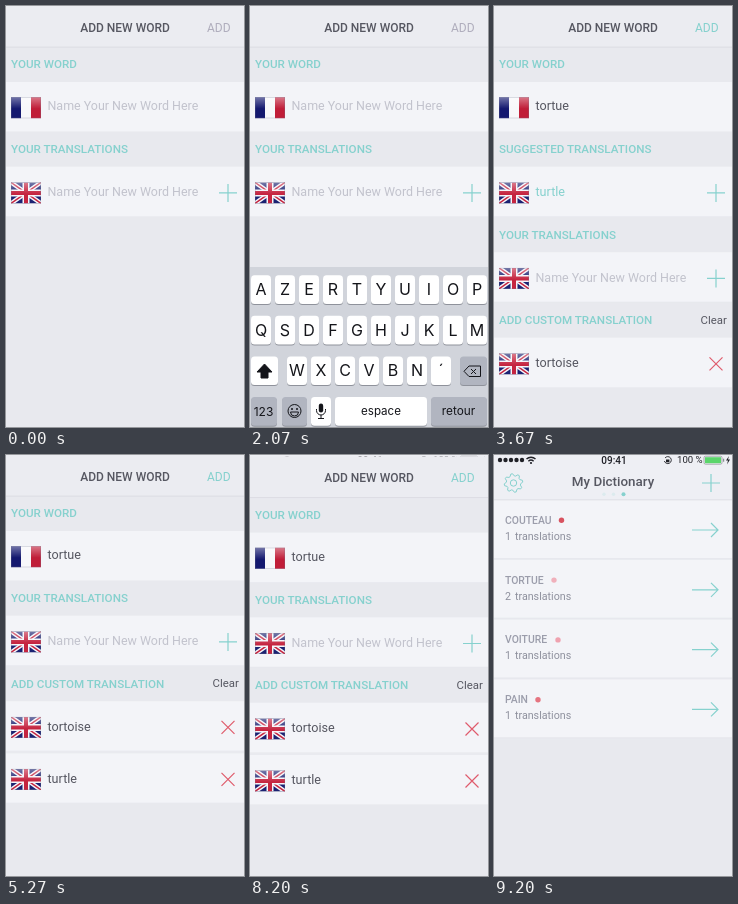
Write an HTML page that moves like this. It is 238 px wide and 421 px high and loops after 9.27 s.

```html
<!DOCTYPE html>
<html lang="en">
<head>
<meta charset="utf-8">
<title>Add new word</title>
<style>
  html, body { margin: 0; width: 100%; height: 100%; overflow: hidden; background: #e8e9ee; }
  svg { display: block; width: 100vw; height: 100vh; }
  text { font-family: Roboto, sans-serif; white-space: pre; }
  .keys text { font-family: Inter, sans-serif; text-anchor: middle; }
  #small text { font-weight: 300; }
</style>
</head>
<body>
<svg id="stage" viewBox="0 0 238 421"></svg>
<script>
const LOOP = 9270;
const TEAL = '#86d1ce', INK = '#565761', RED = '#df5b6c', BG = '#e8e9ee', ROW = '#f3f4f8';
const HINT = '#c2c3cd', PROMPT = 'Name Your New Word Here';

// Shape helpers; text is placed by the middle of its capitals
const text = (x, y, s, size, fill, more = '') =>
  `<text x="${x}" y="${y + size * .36}" font-size="${size}" fill="${fill}" ${more}>${s}</text>`;
const rect = (x, y, w, h, fill, more = '') =>
  `<rect x="${x}" y="${y}" width="${w}" height="${h}" fill="${fill}" ${more}/>`;
const line = (d, color, width = 1, more = '') =>
  `<path d="${d}" fill="none" stroke="${color}" stroke-width="${width}" ${more}/>`;
const dot = (x, y, r, fill) => `<circle cx="${x}" cy="${y}" r="${r}" fill="${fill}"/>`;
const group = (id, body, more = '') => `<g id="${id}" ${more}>${body}</g>`;
const MEDIUM = 'font-weight="500"', TITLE = MEDIUM + ' text-anchor="middle"';

const plus = (x, y) => line(`M${x - 9} ${y}h18M${x} ${y - 9}v18`, TEAL, 1.2);
const cross = (x, y) => line(`M${x - 6.5} ${y - 6.5}l13 13m0-13l-13 13`, RED, 1.2);

const french = y => rect(5, y, 30, 21, '#f7f7fa') + rect(5, y, 10, 21, '#14186f') +
  rect(25, y, 10, 21, '#c01d38') + gloss(y);
const british = y => `<svg x="5" y="${y}" width="30" height="21" viewBox="0 0 30 21">` +
  rect(0, 0, 30, 21, '#1b2272') +
  line('M0 0L30 21M30 0L0 21', '#f5f5f9', 4.4) + line('M0 0L30 21M30 0L0 21', '#c52540', 1.5) +
  line('M15 0V21M0 10.5H30', '#f5f5f9', 7) + line('M15 0V21M0 10.5H30', '#c52540', 4) +
  '</svg>' + gloss(y);
const gloss = y => rect(5, y, 30, 21, 'url(#shine)') +
  rect(5.2, y + .2, 29.6, 20.6, 'none', 'stroke="#777b91" stroke-width=".4" opacity=".6"');

const header = (s, y = 0) => rect(0, y, 238, 35.7, BG) + text(5, y + 17.7, s, 11.65, TEAL, MEDIUM);
const row = (y, label, fill, icon) => rect(0, y, 238, 49.5, ROW) + british(y + 15.7) +
  text(41.5, y + 24.9, label, label === PROMPT ? 12.45 : 12.6, fill) + icon(222, y + 26.2);

function form() {
  const entries = ['tire-bouchon', 'tigre', 'tortue'].map((word, i) => {
    const y = 143.5 + i * 33;
    return `<path d="M10 ${y - 5.5}l15 5.5l-15 5.5z" fill="#f4fbfb"/>` +
      text(31, y, 'You already entered:', 12.5, '#f4fbfb') +
      text(151, y, word, 12.5, '#fff', 'font-weight="700"');
  }).join('');
  return rect(0, 0, 238, 421, BG) +
    group('suggested', header('SUGGESTED TRANSLATIONS') + row(35.5, 'turtle', TEAL, plus)) +
    group('yours', header('YOUR TRANSLATIONS') + row(35.5, PROMPT, HINT, plus)) +
    group('custom', header('ADD CUSTOM TRANSLATION') + text(206.5, 17.7, 'Clear', 11.4, INK) +
      group('added', row(87.5, 'turtle', INK, cross) + rect(0, 85, 238, 2.5, '#e9eaef')) +
      row(35.5, 'tortoise', INK, cross)) +
    group('known', rect(0, 126, 238, 101, '#8ed4d1') + entries, 'clip-path="url(#reveal)"') +
    rect(0, 0, 238, 41, '#ebecf1') + text(119, 21.2, 'ADD NEW WORD', 12, INK, TITLE) +
    text(201, 21.2, 'ADD', 12, '#b0aebd', 'id="add"') +
    header('YOUR WORD', 40.5) + rect(0, 40.7, 238, .8, '#d9dae1') +
    rect(0, 76, 238, 49.5, ROW) + french(91.2) + text(41.5, 99.7, '', 12.6, INK, 'id="word"') +
    rect(42, 92.5, 1.2, 15.5, TEAL, 'id="caret"');
}

function keyboard() {
  const GREY = '#b1b5c0', DARK = '#14151a';
  const key = (x, y, w, fill, more = '') => rect(x, y + 1, w, 28.7, '#8f929b', 'rx="3.5"') +
    rect(x, y, w, 28.7, fill, `rx="3.5" ${more}`);
  const rows = ['azertyuiop', 'qsdfghjklm', 'wxcvbn’'];
  const top = j => 269.2 + 40.6 * j;
  const each = draw => rows.map((r, j) => [...r].map((c, i) =>
    draw(c, (j === 2 ? 47 : 11) + 24 * i, top(j))).join('')).join('');
  const caps = each((c, x, y) => text(x, y + 14.2, c === '’' ? '´' : c.toUpperCase(), 16, DARK));
  const small = each((c, x, y) => text(x, y + 13.7, c, 18, DARK));
  return rect(0, 261, 238, 160, '#d1d4db') +
    each((c, x, y) => key(x - 10, y, 20, '#fff')) +
    key(1, top(2), 27, GREY, 'id="shift"') + key(210, top(2), 27, GREY) +
    `<path id="arrow" d="M14.5 358l7.5 8h-4v6h-7v-6h-4z" stroke="${DARK}" stroke-linejoin="round"/>` +
    line('M219 360h11.5v10.5h-11.5l-5-5.2zM221 363l5 5m0-5l-5 5', DARK, 1, 'stroke-linejoin="round"') +
    group('caps', caps) + group('small', small) +
    key(1, top(3), 26, GREY) + key(32, top(3), 25, GREY) + key(61, top(3), 20, '#fff') +
    key(85, top(3), 92, '#fff') + key(181, top(3), 56, GREY) +
    text(13.5, 405.5, '123', 12, DARK) + text(131, 405, 'espace', 11.6, DARK) +
    text(208.5, 405, 'retour', 11.8, DARK) +
    `<circle cx="44.5" cy="405" r="6.5" fill="none" stroke="${DARK}"/>` +
    dot(42, 403, 1, DARK) + dot(47, 403, 1, DARK) +
    line('M40.5 406h8a4 4 0 0 1-8 0z', DARK) +
    rect(68.8, 397.5, 4.4, 9, DARK, 'rx="2.2"') +
    line('M66.5 403v1.5a4.5 4.5 0 0 0 9 0v-1.5M71 409v3.5M68 412.5h6', DARK);
}

function dictionary() {
  const words = [['COUTEAU', 1, 67.5, '#d8525f'], ['TORTUE', 2, 60, '#f0b0bb'],
    ['VOITURE', 1, 64, '#efa2af'], ['PAIN', 1, 44, '#e57480']];
  const rows = words.map(([word, count, x, color], i) => {
    const y = 45 + i * 59.8;
    return rect(0, y, 238, 58, ROW) + rect(0, y + 58, 238, 1.8, '#e7e8ee') +
      text(11, y + 20, word, 10.4, '#9b9dab', MEDIUM) + dot(x, y + 20.3, 2.7, color) +
      text(11, y + 36, count, 10.7, '#8e909d') + text(21, y + 36, 'translations', 10.7, '#8e909d') +
      line(`M198 ${y + 30}h26m-7-7l7 7l-7 7`, TEAL, 1.2);
  }).join('');
  const gear = Array.from({ length: 32 }, (_, i) => {
    const a = (i + .5) * Math.PI / 16, r = i % 4 < 2 ? 7.2 : 9.3;
    return `${19.5 + r * Math.cos(a)},${28 + r * Math.sin(a)}`;
  }).join(' ');
  const signal = [6, 11.5, 17, 22.5, 28].map(x => dot(x, 5, 2.2, '#202127')).join('');
  return rect(0, 0, 238, 421, BG) + rect(0, 0, 238, 45, '#eeeff4') + rows +
    rect(0, 44.5, 238, .8, '#d9dae1') + signal +
    line('M32.5 4a6.5 6.5 0 0 1 9 0M34.4 6.2a3.8 3.8 0 0 1 5.2 0', '#202127', 1.4) + dot(37, 8, 1.1, '#202127') +
    text(120, 5, '09:41', 10, '#202127', TITLE) +
    line('M171 3a3.5 3.5 0 1 1-.6 3', '#202127', .9) + rect(172, 4.5, 3.4, 2.8, '#202127') +
    text(183, 5, '100 %', 9.6, '#202127') +
    rect(210, 1.2, 18, 8, 'none', 'rx="1.5" stroke="#8a8c93" stroke-width=".7"') +
    rect(211, 2.2, 16, 6, '#5bd66b') + rect(229, 3.7, 1.2, 3, '#8a8c93') +
    '<path d="M235 1l-3 4.5h2l-1 4l3-5h-2z" fill="#202127"/>' +
    `<polygon points="${gear}" fill="none" stroke="${TEAL}" stroke-linejoin="round"/>` +
    `<circle cx="19.5" cy="28" r="3.2" fill="none" stroke="${TEAL}"/>` +
    text(119, 26, 'My Dictionary', 13.4, INK, TITLE) + plus(217, 28) +
    dot(110, 39.3, 1.7, '#dcebee') + dot(119.5, 39.3, 1.7, '#dcebee') + dot(129.5, 39.3, 2, TEAL);
}

const stage = document.getElementById('stage');
stage.innerHTML = '<clipPath id="reveal"><rect id="window" y="126" width="238"/></clipPath>' +
  '<linearGradient id="shine" x2="0" y2="1"><stop stop-color="#fff" stop-opacity=".4"/>' +
  '<stop offset=".55" stop-color="#fff" stop-opacity="0"/></linearGradient>' +
  dictionary() + group('form', form() + group('keyboard', keyboard(), 'class="keys"'));
const el = {};
stage.querySelectorAll('[id]').forEach(e => el[e.id] = e);

const span = (t, start, length) => Math.min(1, Math.max(0, (t - start) / length));
const easeOut = p => 1 - (1 - p) ** 3;
const easeInOut = p => p < .5 ? 4 * p ** 3 : 1 - 4 * (1 - p) ** 3;
const move = (e, y) => e.setAttribute('transform', `translate(0 ${y})`);
const fade = (e, v) => e.setAttribute('opacity', v);

function draw(t) {
  const TYPED = 2200, PICKED = 2950, ACCEPTED = 4050;
  const typed = t >= TYPED, picked = t >= PICKED;
  const known = easeInOut(span(t, TYPED, 300)) - easeInOut(span(t, PICKED, 300));
  const suggested = easeInOut(span(t, TYPED, 300)) - easeInOut(span(t, ACCEPTED, 350));
  const keys = easeOut(span(t, 1095, 460)) - easeOut(span(t, PICKED, 420));
  const y = 125.2 + 99 * known;

  el.window.setAttribute('height', 100.5 * known);
  move(el.suggested, y);
  fade(el.suggested, suggested);
  move(el.yours, y + 85.5 * suggested);
  move(el.custom, y + 85.5 * suggested + 85.5);
  fade(el.custom, span(t, PICKED, 250));
  fade(el.added, span(t, ACCEPTED, 300));

  el.word.textContent = picked ? 'tortue' : typed ? 'T' : PROMPT;
  el.word.setAttribute('fill', typed ? INK : HINT);
  el.word.setAttribute('font-size', typed ? 12.6 : 12.45);
  el.add.setAttribute('fill', picked ? TEAL : '#b0aebd');
  fade(el.caret, +(t > 1100 && !picked && (t - 1100) % 1000 < 550));
  el.caret.setAttribute('x', typed ? 50 : 42);

  move(el.keyboard, 161 * (1 - keys));
  fade(el.caps, +!typed);
  fade(el.small, +typed);
  el.shift.setAttribute('fill', typed ? '#b1b5c0' : '#fff');
  el.arrow.setAttribute('fill', typed ? 'none' : '#14151a');

  move(el.form, 422 * easeInOut(span(t, 8152, 500)));
}

const begin = performance.now();
function tick() {
  draw((performance.now() - begin) % LOOP);
  requestAnimationFrame(tick);
}
tick();
</script>
</body>
</html>
```
